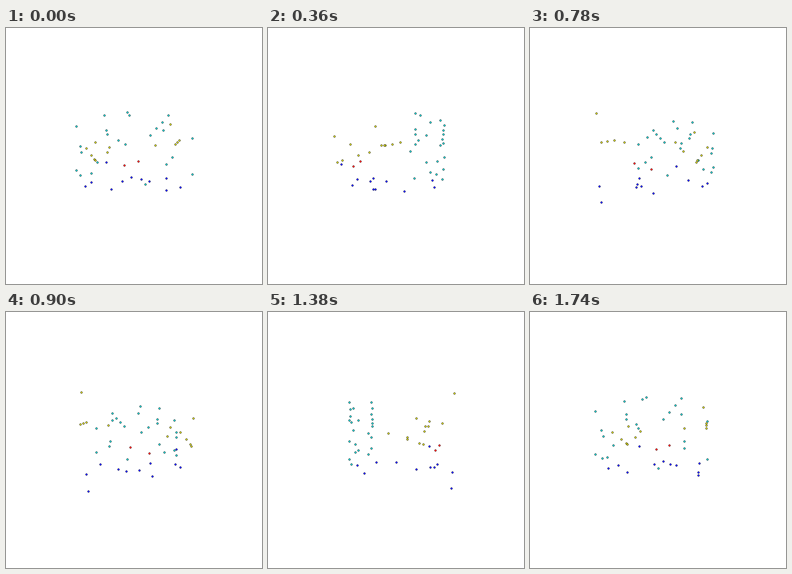
Recreate the animation shown at these times as a matplotlib script. Size 256 px wide and 256 px high, loop 1800 ms.

```python
import numpy as np
import matplotlib.pyplot as plt
from matplotlib.animation import FuncAnimation

SIZE, DPI = 256, 100
FRAMES, INTERVAL = 30, 60
MID, DIST = 128, 213  # vanishing point and eye distance, in pixels

# Space is (right, toward the viewer, down); a wall fixes one axis.
LEFT, RIGHT = (0, -47), (0, 46.5)
FRONT, BACK, INNER = (1, -42.5), (1, 43.5), (1, 25)
FLOOR = (2, 26.3)


def run(wall, start, end=None, n=2, ease=False):
    """Dots along a straight line on a wall, closing up if eased."""
    if end is None:
        end, n = start, 1
    t = np.linspace(0, 1, n)
    if ease:
        t = t * (2 - t)
    flat = np.outer(1 - t, start) + np.outer(t, end)
    return np.insert(flat, *wall, axis=1)


CYAN = [
    run(LEFT, (41, -25), (26, -4), 3, ease=True),
    run(LEFT, (29, 16.4), (41, 11.2)),
    run(RIGHT, (41, 14), (41, -15.3)),
    run(BACK, (-35, 13.5), (-29.7, 4)),
    run(BACK, (-4.7, -33), (-7.9, -10.3)),
    run(BACK, (8.7, 22), (29.7, 0)),
    run(BACK, (27, -33), (12.7, -17), 4),
    run(INNER, (-27.3, -36.3), (-24.7, -19.5), 3, ease=True),
    run(INNER, (-15, -15), (25.5, -23)),
    run(INNER, (-6.2, -39), (28, 6.4)),
]
YELLOW = [
    run(LEFT, (6, -8.7), (-37.3, 4.5), 4, ease=True),
    run(LEFT, (-40.7, -17.8)),
    run((0, -30), (-34.6, -11.4), (-15.5, -4.4)),
    run((0, 23.5), (-25.7, -13.4)),
    run(RIGHT, (-10.5, -17.5), (-31.5, -14.2), 3),
    run(FRONT, (43, -38.8)),
]
BLUE = [
    run(FLOOR, (39.5, 30), (7, -32), 3, ease=True),
    run(FLOOR, (-44.5, -3.5), (-44.5, 20.6)),
    run(FLOOR, (-18.7, 40)),
    run(FLOOR, (38.5, -43.3)),
    run(FRONT, (-33.6, 7), (-14.4, 28.8)),
    run(FRONT, (-3.6, 24), (37.4, 40.2)),
]
RED = [run(FRONT, (3.6, 5), (-12, 9.8))]

fig = plt.figure(figsize=(SIZE / DPI, SIZE / DPI), dpi=DPI, facecolor="white")
ax = fig.add_axes([0, 0, 1, 1])
ax.set_xlim(-0.5, SIZE - 0.5)
ax.set_ylim(SIZE - 0.5, -0.5)
ax.axis("off")

groups = []
for runs, color in ((CYAN, "c"), (YELLOW, "y"), (BLUE, "b"), (RED, "r")):
    line, = ax.plot([], [], "o", color=color, ms=1.3, mec="black", mew=0.2)
    groups.append((line, np.vstack(runs).T))


def project(points, angle):
    right, near, down = points
    c, s = np.cos(angle), np.sin(angle)
    scale = 1 / (1 - (near * c - right * s) / DIST)
    return MID + scale * (right * c + near * s), MID + scale * down


def draw(frame):
    angle = 2 * np.pi * frame / FRAMES
    for line, points in groups:
        line.set_data(*project(points, angle))
    return [line for line, _ in groups]


anim = FuncAnimation(fig, draw, frames=FRAMES, interval=INTERVAL,
                     repeat=True, repeat_delay=0, blit=False)
plt.show()
```
